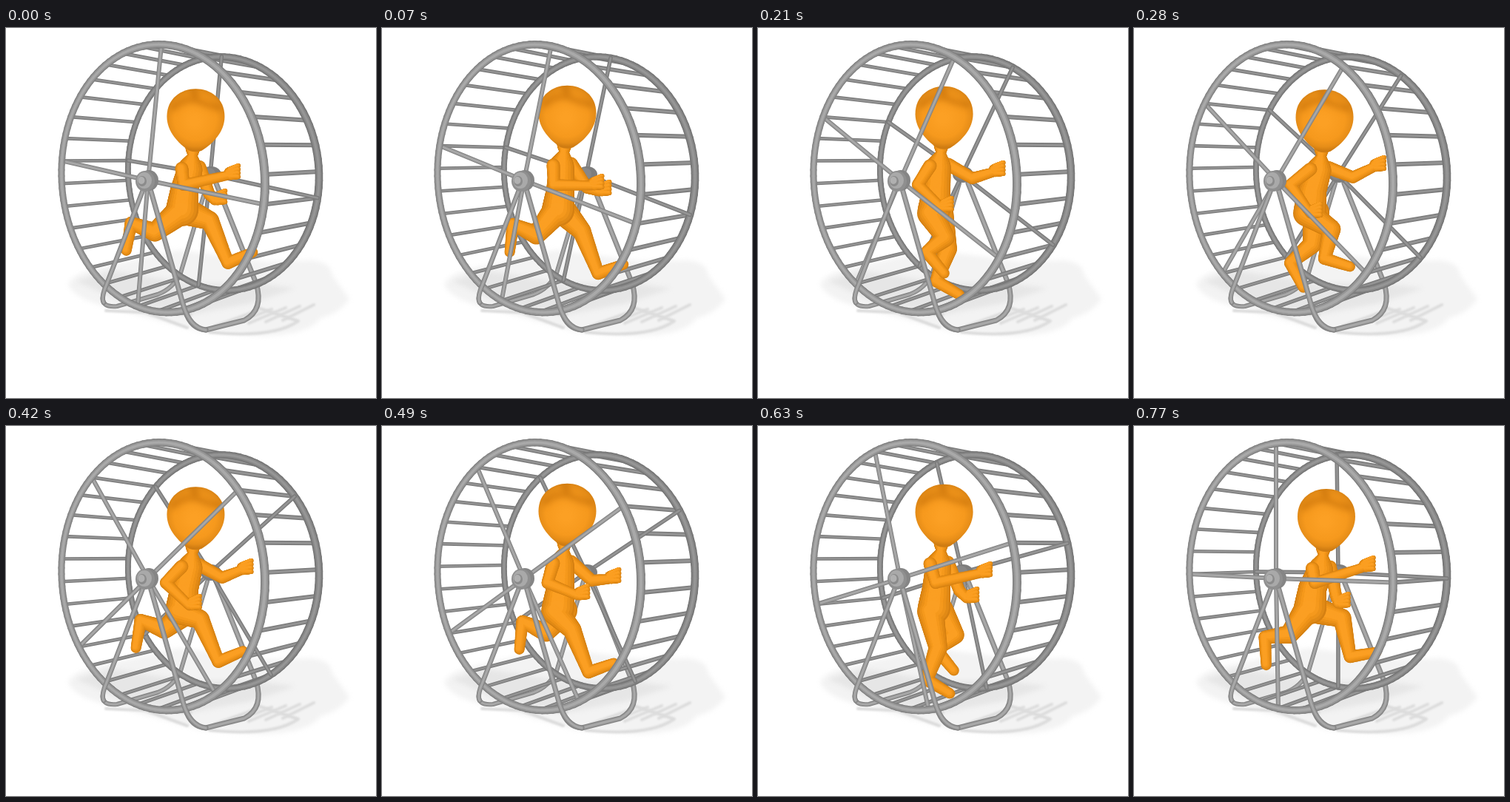
An HTML page with a canvas that plays this animation: 500 px wide and 500 px high, repeating every 0.84 s.

```html
<!DOCTYPE html>
<html>
<head>
<meta charset="utf-8">
<title>Running in the wheel</title>
<style>
  html, body { margin: 0; width: 100%; height: 100%; overflow: hidden; background: #fff; }
  canvas { display: block; }
</style>
</head>
<body>
<canvas id="stage" width="500" height="500"></canvas>
<script>
const ctx = document.getElementById('stage').getContext('2d');
const STEP = 70, STEPS = 12, TURN = 7.5, RUNGS = 32;

// Perspective of the two wheel faces: x and y as [centre, across, up], w as [across, up]
const FRONT = { x: [193.5, 108.2, -4.2], y: [205, -22.6, -182], w: [-0.138, -0.014] };
const BACK = { x: [275, 85.8, -9.2], y: [200.8, -25.1, -162], w: [-0.147, -0.03] };

// Shading from edge to middle: [share of width, colour]
const STEEL = [[1, '#818181'], [0.72, '#969696'], [0.35, '#a9a9a9']];
const DARK = [[1, '#777'], [0.65, '#888'], [0.3, '#969696']];
const SKIN = [[1, '#d58012'], [0.9, '#e18a16'], [0.75, '#ec9219'], [0.58, '#f5991d'], [0.4, '#fb9f23']];

// Cosine that peaks at the given step, with a number of cycles per loop
const wave = (step, peak, cycles = 1) => Math.cos((step - peak) * cycles * 2 * Math.PI / STEPS);

function rim({ x, y, w }, degrees) {
  const a = degrees * Math.PI / 180, u = Math.sin(a), v = Math.cos(a);
  const depth = 1 + w[0] * u + w[1] * v;
  return [(x[0] + x[1] * u + x[2] * v) / depth, (y[0] + y[1] * u + y[2] * v) / depth, depth];
}

function tube(path, width, shades = STEEL) {
  ctx.lineCap = ctx.lineJoin = 'round';
  for (const [share, colour] of shades) {
    ctx.lineWidth = width * share;
    ctx.strokeStyle = colour;
    ctx.stroke(path);
  }
}

function line([x1, y1], [x2, y2]) {
  const path = new Path2D();
  path.moveTo(x1, y1);
  path.lineTo(x2, y2);
  return path;
}

// The nearer a stretch of the ring, the thicker it is
function ring(face, width, shades) {
  for (const shade of shades) {
    for (let a = 0; a < 360; a += 3) {
      const from = rim(face, a);
      tube(line(from, rim(face, a + 3)), width / from[2], [shade]);
    }
  }
}

function oval(x, y, rx, ry, fill) {
  ctx.fillStyle = fill;
  ctx.beginPath();
  ctx.ellipse(x, y, rx, ry, 0, 0, 7);
  ctx.fill();
}

// Tapered limbs, each a list of [x, y, radius], shaded together as one body
function flesh(...limbs) {
  for (const [share, colour] of SKIN) {
    const lift = (1 - share) * 2.5;
    for (const points of limbs) {
      for (let i = 1; i < points.length; i++) {
        const a = points[i - 1], b = points[i];
        for (let t = 0; t <= 1.001; t += 0.04) {
          const [x, y, r] = a.map((v, j) => v + (b[j] - v) * t);
          oval(x - lift, y - lift, r * share, r * share, colour);
        }
      }
    }
  }
}

function drawShadow() {
  ctx.filter = 'blur(3px)';
  ctx.fillStyle = '#f3f3f3';
  ctx.fill(new Path2D('M84 346Q92 330 135 322L235 300 350 315 415 314Q440 318 440 333L464 366Q452 385 425 392 410 415 345 416L265 411 150 380 Q92 368 84 346Z'));
  ctx.fillStyle = '#e6e6e6';
  ctx.fill(new Path2D('M95 342L140 328 250 345 340 345 390 352 330 372 250 387 160 372Z'));
  ctx.filter = 'blur(1px)';
  ctx.lineWidth = 4;
  ctx.strokeStyle = '#dcdcdc';
  ctx.stroke(new Path2D('M135 382L250 387M275 411Q360 420 395 396L340 378M185 383L245 405'));
  for (let i = 0; i < 5; i++) ctx.stroke(line([282 + i * 23, 403 - i * 2], [340 + i * 19, 382 - i * 2]));
  ctx.filter = 'none';
}

function drawWheelBack(angle) {
  tube(new Path2D('M272 210L236 331Q226 352 205 360L150 376Q128 378 131 362'), 6);
  tube(new Path2D('M284 210L338 345Q349 381 322 395L270 408Q250 407 242 382'), 7);
  for (let i = 0; i < RUNGS; i++) {
    const a = angle + i * 360 / RUNGS, from = rim(FRONT, a);
    tube(line(from, rim(BACK, a)), 5.2 / from[2], DARK);
  }
  ring(BACK, 9, DARK);
  for (let a = angle; a < angle + 360; a += 90) tube(line(rim(BACK, a), [276, 198]), 5.5, DARK);
  oval(277, 198, 14, 11, '#7d7d7d');
  oval(274, 197, 9, 8, '#878787');
}

function drawWheelFront(angle) {
  for (let a = angle; a < angle + 360; a += 90) tube(line(rim(FRONT, a), [192, 206]), 6);
  ring(FRONT, 10.2, STEEL);
  tube(new Path2D('M187 214L133 354Q129 366 132 371'), 6.5);
  tube(new Path2D('M194 214L240 376Q249 405 270 408'), 7);
  oval(193, 206, 13, 14, '#858585');
  oval(188, 207, 13, 14, '#8f8f8f');
  oval(187, 206, 10, 11, '#a9a9a9');
  oval(184, 207, 6, 7, '#8b8b8b');
  oval(183, 206, 4.5, 5, '#b0b0b0');
}

// Knee and heel swing around the hip while the foot rolls from toe-off to landing
function leg(x, y, step) {
  const kneeX = x + 7 + 31 * wave(step, 5.7) + 9 * wave(step, 3.4, 2);
  const kneeY = y + 30 + 11 * wave(step, 10.4) + 12 * wave(step, 2.7, 2);
  const heelX = x - 5 + 59 * wave(step, 6);
  const heelY = y + 57 + 34 * wave(step, 7.2) + 16 * wave(step, 3, 2);
  const roll = (39 + 62 * wave(step, 0.3)) * Math.PI / 180;
  const toe = [heelX + 36 * Math.cos(roll), heelY + 38 * Math.sin(roll), 7];
  return [[x, y, 18], [kneeX, kneeY, 12.5], [heelX, heelY, 8.5], toe];
}

function drawArm(shoulder, elbow, [x, y]) {
  const fingers = [-7, -2, 3, 8].map(side => [[x - 2, y + side * 0.6, 4.5], [x + 9, y + side - 3, 3]]);
  flesh([[...shoulder, 9], [...elbow, 8], [x - 5, y + 3, 6.5]], [[x - 3, y, 8], [x + 1, y, 8]], ...fingers);
}

function drawHead(x, y) {
  const glow = ctx.createRadialGradient(-2, 4, 6, 0, 0, 43);
  glow.addColorStop(0, '#fca024');
  glow.addColorStop(0.6, '#f6991d');
  glow.addColorStop(0.85, '#e68d18');
  glow.addColorStop(1, '#cf7c12');
  const shape = new Path2D('M-39 -2C-39 -52 39 -52 39 -2C39 18 24 34 8 44Q0 47 -9 44C-24 34 -39 18 -39 -2Z');
  ctx.save();
  ctx.translate(x, y);
  ctx.fillStyle = glow;
  ctx.fill(shape);
  ctx.clip(shape);
  ctx.filter = 'blur(4px)';
  ctx.lineWidth = 7;
  ctx.strokeStyle = 'rgba(175,95,0,.5)';
  ctx.stroke(new Path2D('M-30 -14Q-12 -30 4 -23T32 -14M2 -24L-4 -40'));
  ctx.restore();
}

function drawRunner(step) {
  const bob = wave(step, 4.9, 2), swing = wave(step, 10.5);
  const x = 254 + 6 * bob, y = 120 + 4.5 * bob;
  const farShoulder = [x + 5, y + 66], farHand = [305 - 25 * swing, 211 + 27 * swing];
  const farElbow = farShoulder.map((v, i) => (v + farHand[i]) / 2 + 15 * i);
  const torso = [[x - 4, y + 40, 10], [x - 4, y + 51, 6], [x - 8, y + 70, 17], [241, 220, 19], [238, 246, 22]];
  flesh(leg(246, 249, step + STEPS / 2));
  drawArm(farShoulder, farElbow, farHand);
  flesh(torso, leg(233, 250, step));
  drawHead(x, y);
  drawArm([x - 19, y + 68], [228 + 17 * swing, 212], [279 + 37 * swing, 218 - 31 * swing]);
}

function draw(now) {
  const step = Math.floor(now / STEP) % STEPS, angle = (step + 1) * TURN;
  ctx.clearRect(0, 0, 500, 500);
  drawShadow();
  drawWheelBack(angle);
  drawRunner(step);
  drawWheelFront(angle);
}

const start = performance.now();
function tick() {
  draw(performance.now() - start);
  requestAnimationFrame(tick);
}
tick();
</script>
</body>
</html>
```
